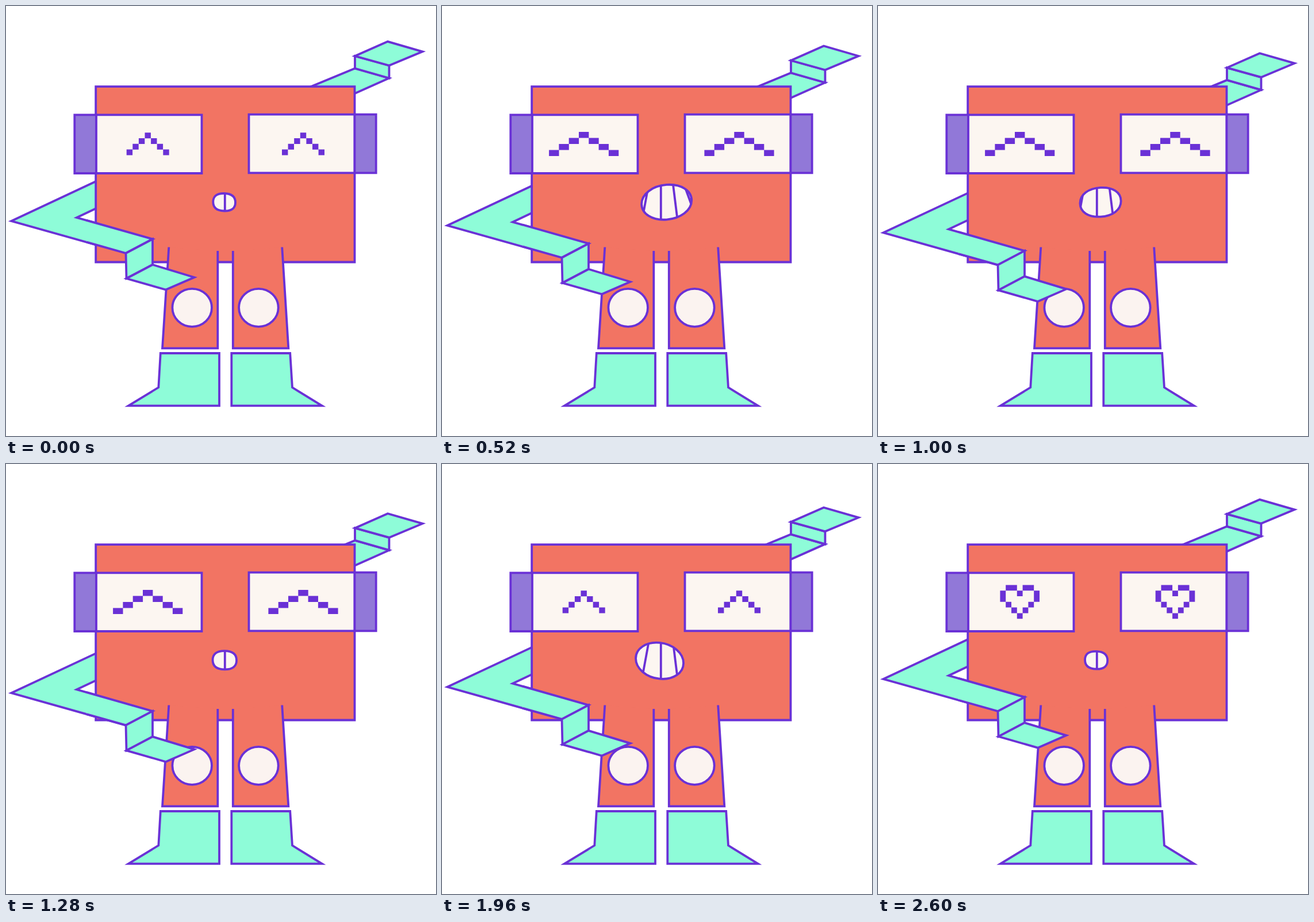
Animation, 748 px wide and 748 px high, one loop 2.64 s. Source, as an HTML page:

```html
<!DOCTYPE html>
<html lang="en">
<head>
<meta charset="utf-8">
<title>Box character</title>
<style>
  html, body { margin: 0; width: 100%; height: 100%; overflow: hidden; background: #fff; }
  svg { display: block; width: 100%; height: 100%; }
  .line { stroke: #6a31d6; stroke-width: 3.8; stroke-miterlimit: 10; fill: none; }
  .coral { fill: #f27463; }
  .mint { fill: #8efcd8; }
  .paper { fill: #fcf6f1; }
  .lens { fill: #9178d8; }
  .eye { fill: #6a31d6; }
</style>
</head>
<body>
<svg viewBox="0 0 748 748">
  <defs><clipPath id="lips"><path class="mouth"/></clipPath></defs>

  <g class="arm line mint">
    <path d="M520 144.5L607 108.5 666.5 125.5 560 173"/>
    <path d="M607 87L666.5 103.5V125.5L607 108.5Z"/>
    <path d="M607 87L664 61.8 724.5 79.3 666.5 103.5Z"/>
    <path d="M180 294L9.3 374 208.5 430 255 405.5 123 368 180 341"/>
  </g>

  <path class="line coral" d="M156.2 140.2H606.5V445.5H156.2Z"/>

  <path class="line lens" d="M119.3 189.3H157V291H119.3Z"/>
  <path class="line paper" d="M157 189.3H340.5V291H157Z"/>
  <path class="line lens" d="M606.3 188.7H643.7V290.3H606.3Z"/>
  <path class="line paper" d="M422.5 188.7H606.3V290.3H422.5Z"/>
  <path class="eye" transform="translate(246.7 0)"/>
  <path class="eye" transform="translate(517 0)"/>

  <path class="mouth paper"/>
  <path class="line" clip-path="url(#lips)"
        d="M380.8 300V385M360.3 306L348.7 369M401.4 306L409.6 372M423 316L434 346"/>
  <path class="mouth line"/>

  <path class="line coral" d="M283.3 419.5L272 595.3H368.3V426"/>
  <path class="line coral" d="M394.8 426V595.3H491.3L480.2 419.5"/>
  <g class="line" style="fill:#fbf3f0">
    <ellipse cx="323.7" cy="524.8" rx="34.3" ry="33"/>
    <ellipse cx="439.4" cy="524.8" rx="34.3" ry="33"/>
  </g>
  <g class="line mint">
    <path d="M268.8 604H371V695.4H213L265.3 663.5Z"/>
    <path d="M392.3 604H494.2L498 663.5 549.7 695.4H392.3Z"/>
  </g>

  <g class="arm line mint">
    <path d="M140 372.8L255 405.5 208.5 430 140 410.7"/>
    <path d="M208.5 430L255 405.5V450L209.5 474Z"/>
    <path d="M209.5 474L255 450 327.5 472 278 493.6Z"/>
  </g>
</svg>
<script>
const LOOP = 2640;
const all = name => document.querySelectorAll(name);
const arms = all('.arm'), eyes = all('.eye'), mouths = all('.mouth');

const block = (x, y, w, h) => `M${x - w / 2} ${y - h / 2}h${w}v${h}h${-w}z`;

// Stepped caret made of seven blocks
function caret(top, dx, dy, w, h) {
  let d = '';
  for (let i = -3; i <= 3; i++) d += block(i * dx, top + Math.abs(i) * dy, w, h);
  return d;
}

function pixels(rows, top, size) {
  let d = '';
  rows.forEach((row, j) => [...row].forEach((c, i) => {
    if (c === '#') d += block((i - 3) * size, top + j * size, size, size);
  }));
  return d;
}

const smile = caret(225.3, 10.6, 9.7, 10.4, 10);
const grin = caret(224.3, 17.3, 10.5, 17.4, 10.5);
const heart = pixels([' ## ## ', '#  #  #', '#     #', ' #   # ', '  # #  ', '   #   '], 215.3, 9.8);
const looks = [[0, smile], [330, grin], [1780, smile], [2120, heart]];

// time, then values: arm drop
const drop = [[0, 0], [1380, 24.7], [LOOP, 0]];

// time, then: left, right, top, bottom, tilt, roundness
const small = [360.3, 399, 326, 356.5, 0.5, 0.66];
const mouth = [
  [0, ...small],
  [690, 345, 440, 308.5, 374, -3.8, 0.552],
  [1380, ...small],
  [2050, 336, 421, 310.3, 374.5, 4.2, 0.552],
  [LOOP, ...small]
];

function sample(keys, t) {
  const i = keys.findIndex(k => k[0] > t);
  const a = keys[i - 1], b = keys[i];
  const e = (1 - Math.cos(Math.PI * (t - a[0]) / (b[0] - a[0]))) / 2;
  return a.slice(1).map((v, n) => v + (b[n + 1] - v) * e);
}

function mouthPath([l, r, t, b, tilt, k]) {
  const cx = (l + r) / 2, cy = (t + b) / 2, rx = (r - l) / 2, ry = (b - t) / 2;
  const p = (x, y) => `${(cx + x * rx).toFixed(2)} ${(cy + y * ry + x * tilt).toFixed(2)} `;
  return 'M' + p(1, 0) +
    'C' + p(1, k) + p(k, 1) + p(0, 1) +
    'C' + p(-k, 1) + p(-1, k) + p(-1, 0) +
    'C' + p(-1, -k) + p(-k, -1) + p(0, -1) +
    'C' + p(k, -1) + p(1, -k) + p(1, 0) + 'Z';
}

function draw(t) {
  const [y] = sample(drop, t);
  arms.forEach(a => a.setAttribute('transform', `translate(0 ${y.toFixed(2)})`));
  const lips = mouthPath(sample(mouth, t));
  mouths.forEach(m => m.setAttribute('d', lips));
  const look = looks.filter(l => l[0] <= t).pop()[1];
  eyes.forEach(e => e.setAttribute('d', look));
}

const start = performance.now();
function tick() {
  draw((performance.now() - start) % LOOP);
  requestAnimationFrame(tick);
}
draw(0);
requestAnimationFrame(tick);
</script>
</body>
</html>
```
